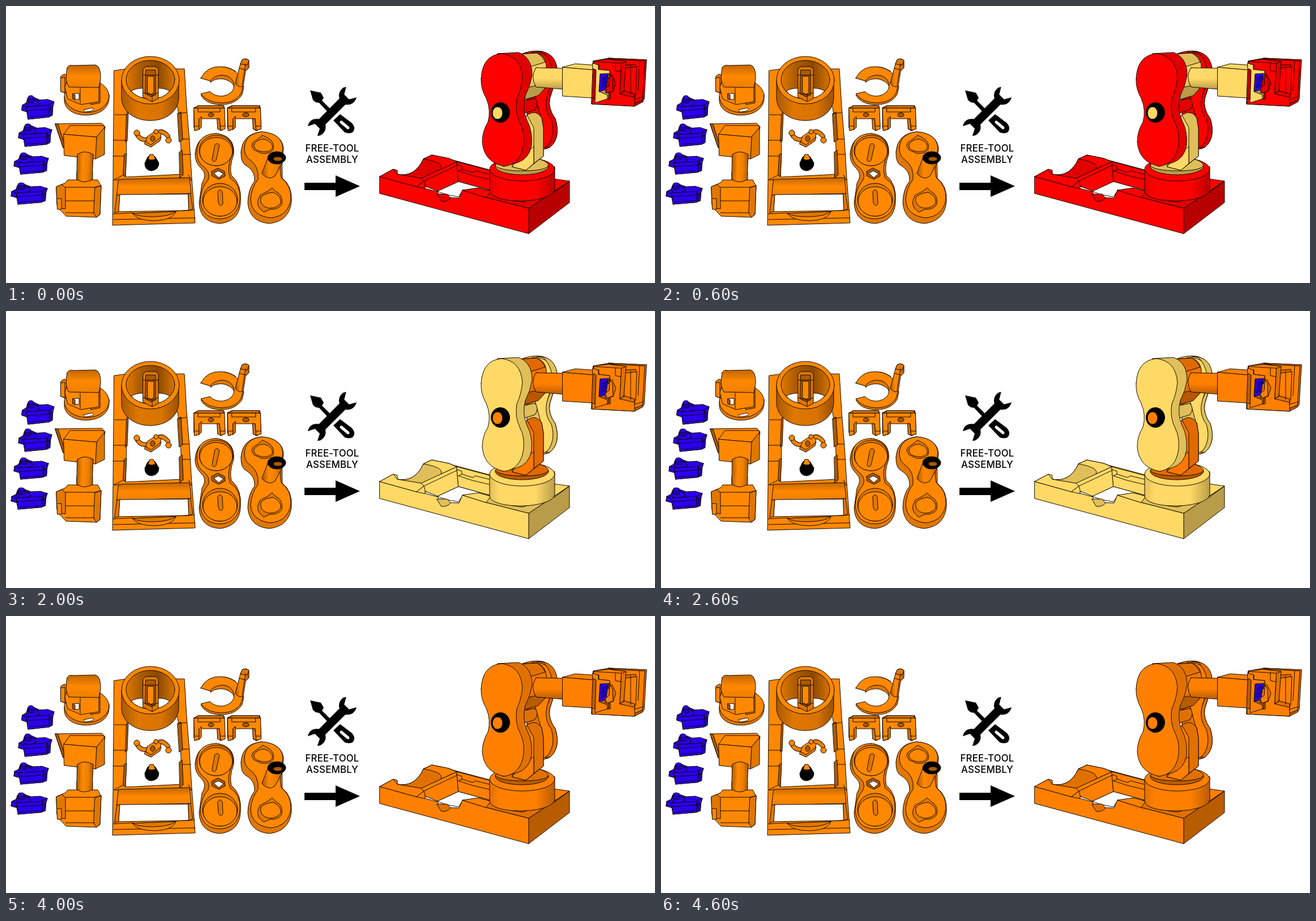
An HTML page that plays this animation: 1146x489 px, repeating every 5 s.

```html
<!DOCTYPE html>
<html lang="en">
<head>
<meta charset="utf-8">
<title>Free-tool assembly</title>
<style>
html, body { margin: 0; width: 100%; height: 100%; overflow: hidden; background: #fff; }
svg { display: block; width: 100%; height: 100%; }
g { stroke-linejoin: round; stroke-linecap: round; }
.edge { stroke: #160b00; stroke-width: 1; }
.o1 { fill: #ff8800; } .o2 { fill: #df7700; } .o3 { fill: #a95a00; }
.a1 { fill: var(--a1); } .a2 { fill: var(--a2); } .a3 { fill: var(--a3); }
.b1 { fill: var(--b1); } .b2 { fill: var(--b2); } .b3 { fill: var(--b3); }
.f1 { fill: var(--f1); } .f2 { fill: var(--f2); } .f3 { fill: var(--f3); }
.g1 { fill: var(--g1); } .g2 { fill: var(--g2); } .g3 { fill: var(--g3); }
.h1 { fill: var(--h1); } .h2 { fill: var(--h2); }
.k1 { fill: var(--k1); }
.blue { fill: #2a00ef; } .navy { fill: #1e00b4; }
.w { fill: #fff; } .n { fill: none; } .black { fill: #000; }
text { font: 500 16.8px Inter, "DejaVu Sans", sans-serif; text-anchor: middle; letter-spacing: .2px; }
</style>
</head>
<body>
<svg viewBox="0 0 1146 489" preserveAspectRatio="none">
<defs>
  <linearGradient id="tube"><stop stop-color="#a95a00"/><stop offset=".35" stop-color="#ff8800"/><stop offset=".7" stop-color="#ee7f00"/><stop offset="1" stop-color="#a95a00"/></linearGradient>
  <linearGradient id="collar"><stop stop-color="#a95a00"/><stop offset=".3" stop-color="#df7700"/><stop offset=".7" stop-color="#d97300"/><stop offset="1" stop-color="#9a5200"/></linearGradient>
  <linearGradient id="bore"><stop stop-color="#e07800"/><stop offset=".3" stop-color="#aa5b00"/><stop offset=".65" stop-color="#8a4900"/><stop offset="1" stop-color="#d87400"/></linearGradient>
  <linearGradient id="roll" x2="0" y2="1"><stop stop-color="#c06600"/><stop offset=".5" stop-color="#ff8800"/><stop offset="1" stop-color="#ee7f00"/></linearGradient>
  <linearGradient id="drum"><stop style="stop-color:var(--a2)"/><stop offset=".15" style="stop-color:var(--a1)"/><stop offset=".7" style="stop-color:var(--a1)"/><stop offset="1" style="stop-color:var(--a3)"/></linearGradient>
  <linearGradient id="wrist" x2="0" y2="1"><stop style="stop-color:var(--f1)"/><stop offset=".5" style="stop-color:var(--f1)"/><stop offset="1" style="stop-color:var(--f3)"/></linearGradient>
  <linearGradient id="hub" x2="0" y2="1"><stop style="stop-color:var(--b2)"/><stop offset=".5" style="stop-color:var(--b1)"/><stop offset="1" style="stop-color:var(--b3)"/></linearGradient>
  <g id="servo" class="edge">
    <path class="navy" d="M1 18L8 14L10 6Q16 0 23 5L32 9L46 8L49 11L57 12L55 19L54 36L48 39L11 43L9 30L0 27Z"/>
    <path class="blue" d="M8 20L48 18V39L11 43Z"/>
    <path class="blue" d="M1 18L8 14L32 9L46 8L57 12L48 18L8 21Z"/>
    <path class="blue" d="M1 18L8 21L9 30L0 27ZM49 17L57 12L55 20L50 24Z"/>
    <path class="blue" d="M8 13Q14 7 22 9Q31 11 30 17Q20 23 10 19Z"/>
    <path class="navy" d="M11 5V13Q16 16 21 13V5"/>
    <ellipse class="blue" cx="16" cy="4.500" rx="5" ry="3.500"/>
    <path class="n" d="M9 28L48 25M48 25L54 22M13 39L46 36"/>
  </g>
  <g id="bracket" class="edge">
    <path class="o3" d="M1 5L8 1H54L56 38L50 45L43 42V22H13V40L4 45L1 40Z"/>
    <path class="o1" d="M1 5H55L56 42L48 45L46 24H10V43L2 45Z"/>
    <path class="o2" d="M1 5L9 1H51L55 5ZM10 24L14 20V39L10 43ZM42 24H46L48 45L43 42Z"/>
    <path class="n" d="M8 5V12H47V5M3 37H9M48 37H55"/>
    <ellipse class="o3" cx="31" cy="17" rx="5" ry="3.500"/>
  </g>
</defs>

<g id="servos"></g>

<g class="edge">
  <!-- disc with motor housing -->
  <path class="o2" d="M103 160V167C105 202 181 202 182 163V156Z"/>
  <ellipse class="o1" cx="142.500" cy="159" rx="39.500" ry="29"/>
  <path class="o2" d="M150 174L166 171V133L162 128Z"/>
  <path class="o2" d="M97 124L103 120L109 124V155L97 151Z"/>
  <path class="o1" d="M97 127L104 126V153L97 151Z"/>
  <path class="o1" d="M104 143L109 128L164 131V169L132 174L109 164Z"/>
  <path fill="url(#roll)" d="M108 109Q111 103 119 105L158 104Q168 107 167 129L164 144L111 143Q103 131 108 109Z"/>
  <path class="n" d="M131 145V172"/>
  <path class="w" d="M118 155L129 154V165L121 165Z"/>
  <path class="o3" d="M118 155L122 157V165L118 164Z"/>
  <path class="w" d="M138 183L152 180Q157 181 152 185L141 187Q136 187 138 183Z"/>

  <!-- wrist piece -->
  <path class="o1" d="M87 208L169 207L175 213L172 229L110 253L101 250Z"/>
  <path class="o3" d="M87 208L92 209L106 252L101 250Z"/>
  <path class="o2" d="M160 231L174 213V262L158 270Z"/>
  <path class="o1" d="M102 226L160 231L158 270L103 264Z"/>
  <path class="o1" d="M102 226L113 211H171L174 214L160 231Z"/>
  <path fill="url(#tube)" d="M126 262Q138 253 154 262L152 306Q138 315 125 306Z"/>
  <path class="o1" d="M89 319L105 312L109 307H162L168 318L166 368L160 373L106 371L91 355Z"/>
  <path class="o2" d="M157 321L168 317L166 367L160 373L155 366Z"/>
  <path fill="url(#tube)" d="M125 294H153V306Q138 315 124 306Z" stroke="none"/>
  <path class="n" d="M105 320H157L168 317M105 344H156M105 365H156M125 293V306Q138 315 153 306V293"/>
  <path class="o2" d="M89 319L99 315L105 321V358L96 357L90 350Z"/>
  <path class="o1" d="M90 340H98V359H91Z"/>

  <!-- base frame -->
  <path class="o1" d="M191 114L213 111H315L319 178L324 239L328 304L334 383L188 387L189 307Z"/>
  <path class="w" d="M215 180L303 178L307 208L311 297L211 302L213 237Z"/>
  <path class="o3" d="M303 190L309 187L312 236L306 240ZM213 190L216 187L214 238L211 240ZM209 262L213 260L211 301L207 299ZM306 258L311 254L313 298L307 303Z"/>
  <path class="n" d="M190 237H213M324 235H311M192 192H212M304 190L319 188M189 265H209M311 262H326M206 299L190 307H328L322 298"/>
  <path fill="url(#roll)" d="M199 306L324 303L327 331L196 334Z"/>
  <path class="w" d="M201 333L322 332L323 361L199 363Z"/>
  <path class="o2" d="M196 334L201 333L199 363L192 365ZM322 332L326 331L330 358L323 361Z"/>
  <path class="n" d="M189 367L223 365M299 362L333 360M190 377L334 374"/>
  <path class="o1" d="M223 366L300 363Q294 378 262 379Q232 379 223 366Z"/>
  <path class="o2" d="M223 366Q235 373 263 372Q290 371 300 363Z"/>

  <!-- round socket -->
  <path fill="url(#collar)" d="M204 131V164C208 214 300 216 305 164V131Z"/>
  <ellipse class="o1" cx="255" cy="131" rx="51" ry="42"/>
  <ellipse fill="url(#bore)" cx="255" cy="130" rx="43" ry="34"/>
  <path class="w" d="M221 150Q230 145 242 145H269Q281 145 289 150Q278 164 255 164Q231 163 221 150Z"/>
  <path class="o2" d="M242 111L247 107H264L269 111V163L258 169L242 161Z"/>
  <path class="o3" d="M247 113H264V157L256 160L246 155Z"/>
  <path class="o1" d="M250 124H261V153L256 156L250 153Z"/>
  <path class="n" d="M242 122H269M242 153L258 157L269 153M258 157V168"/>

  <!-- linkage -->
  <path class="n" d="M231 226Q238 239 251 235M268 224Q276 218 286 230" stroke-width="8"/>
  <path class="n" d="M231 226Q238 239 251 235M268 224Q276 218 286 230" style="stroke:#f08000;stroke-width:6"/>
  <path class="o1" d="M250 230L265 220L274 226L272 236L256 249L246 243Z"/>
  <path class="o2" d="M246 239L256 245L274 231L272 238L256 249L245 244Z"/>
  <ellipse class="o3" cx="259" cy="234" rx="4" ry="5"/>
  <circle class="o1" cx="231" cy="224" r="5"/><circle class="o1" cx="287" cy="237" r="5"/><circle class="o1" cx="265" cy="222" r="4"/>

  <!-- threaded pin -->
  <path class="black" d="M250 267Q257 259 264 267L270 277Q270 289 257 291Q245 290 245 278Z"/>
  <path class="o1" d="M251 270L254 262H260L264 270Q257 274 251 270Z"/>

  <!-- open ring -->
  <path class="o2" d="M344 127L361 132V135Q369 127 385 129Q407 136 402 150Q395 164 378 161Q365 160 360 152L344 157Q352 172 374 174Q405 176 417 156L420 143L405 115Q374 95 344 127Z"/>
  <path class="o1" d="M344 127Q355 106 379 107Q411 109 418 138Q418 169 382 171Q356 171 344 155L360 151Q369 160 383 159Q403 155 403 139Q399 122 381 122Q367 123 361 132Z"/>
  <path fill="url(#tube)" d="M405 136L414 102L417 95Q423 91 429 96V109L423 115L419 141Q411 146 405 136Z"/>
  <path class="o2" d="M414 102L417 95Q423 91 429 96L426 104Z"/>
  <path class="n" d="M412 110L424 113M423 102L417 140"/>
  <use href="#bracket" x="331" y="175"/>
  <use href="#bracket" transform="translate(390 175) scale(1.080 1)"/>

  <!-- flat link -->
  <path class="o2" d="M334 261Q336 228 371 225Q405 229 402 262Q394 284 398 299Q417 315 414 347Q412 380 378 384Q343 382 341 348L346 313Q356 297 345 287Q333 276 334 261Z"/>
  <path class="o1" d="M337 258Q338 226 371 225Q401 229 401 258Q388 286 396 304Q415 315 413 342Q410 374 377 376Q344 374 343 341Q345 320 357 307Q362 294 349 284Q337 276 337 258Z"/>
  <ellipse class="o2" cx="371" cy="255" rx="30" ry="27"/><ellipse class="o1" cx="371" cy="257" rx="29" ry="25"/>
  <ellipse class="o2" cx="378" cy="342" rx="31" ry="29"/><ellipse class="o1" cx="378" cy="345" rx="30" ry="26"/>
  <path class="o2" d="M369 245Q373 240 377 246L371 272Q367 278 364 272ZM374 328Q378 321 382 328L383 349Q378 357 375 347Z"/>
  <path class="o3" d="M363 292L374 286L386 292L387 300L376 306L364 300Z"/>
  <path class="w" d="M367 295L375 291L384 296L376 303Z"/>

  <!-- link with axle -->
  <path class="o2" d="M415 258Q417 226 451 222Q488 225 490 252Q486 279 488 304Q506 318 504 346Q500 380 465 384Q430 381 427 348Q427 324 439 309Q440 292 426 283Q414 278 415 258Z"/>
  <path class="o1" d="M421 250Q423 225 452 222Q487 225 489 251Q481 282 486 303Q504 317 503 340Q499 371 467 374Q433 370 432 341Q434 320 445 306Q447 283 431 272Q420 264 421 250Z"/>
  <path class="o2" d="M436 241L447 233L453 228L461 232Q475 239 472 253Q466 262 451 260L438 254L434 247ZM449 334L462 327L470 321L476 327Q490 334 487 350Q481 360 466 359L455 364L447 356Q441 346 449 334Z"/>
  <path class="o1" d="M438 244Q444 235 456 235Q473 240 470 252Q463 260 447 256Q436 252 438 244ZM450 338Q457 330 472 329Q487 336 485 348Q479 357 464 357Q447 353 450 338Z"/>
  <path fill="url(#tube)" d="M463 268L488 276L475 300Q464 309 452 296Z"/>
  <ellipse class="black" cx="478" cy="268" rx="16" ry="11"/>
  <ellipse class="o3" cx="480" cy="270" rx="8" ry="4"/>
</g>

<!-- crossed tools and arrow -->
<g>
  <path class="black" d="M537 149L556 153L561 162L558 167L574 183L569 188L553 171L547 170L542 166Z"/>
  <path class="black" transform="translate(576 186) rotate(-45)" d="M-32 -7H25Q30 -17 43 -16L48 -13L36 -6V6L48 13Q34 20 25 8H-25Q-32 19 -45 15L-49 12L-37 6V-6L-49 -12Q-36 -20 -26 -7Z"/>
  <path class="black" d="M578 202L590 191L610 206Q619 215 612 223Q606 226 598 223Z"/>
  <path d="M592 205L604 215" stroke="#fff" stroke-width="5"/>
  <text x="576" y="257">FREE-TOOL</text>
  <text x="576" y="276.500">ASSEMBLY</text>
  <path class="black" d="M527 312H582V299L625 318L582 337V325H527Z"/>
</g>

<!-- assembled arm -->
<g class="edge">
  <path class="a1" d="M660 301L684 288L691 290V297Q722 303 737 270L752 263L797 274L857 290L995 309L923 358Z"/>
  <path class="a2" d="M691 297Q722 303 737 270L752 263L782 269L797 275L734 305L717 302Z"/>
  <path class="a1" d="M737 270L752 263L782 269L796 275L768 288Q774 276 737 270Z"/>
  <path class="a1" d="M733 304L796 275L799 310L762 327L740 318Z"/>
  <path class="a1" d="M796 275L857 291V326L799 310Z"/>
  <path class="n" d="M738 309L797 281M797 280L805 283V288L824 294L829 291L857 298M799 291L805 288M799 291L823 299L857 307"/>
  <path class="w" d="M762 327L799 310L857 326L806 326L799 337L778 333Z"/>
  <path class="a3" d="M923 357L995 309V347L923 402Z"/>
  <path class="a1" d="M660 301L725 319L733 318L740 322L762 328Q765 337 777 338L800 339L806 325L848 338L923 357V402L660 331Z"/>
  <path class="a1" d="M725 319L738 309L733 304L691 297L684 288L660 301Z"/>
  <path class="a2" d="M853 327Q873 343 912 346L968 329L995 309L923 357L848 338Z"/>
  <path class="a1" d="M806 325L834 321L856 327L848 338ZM725 319L738 309L740 317V322Z"/>
  <path class="a2" d="M761 332L779 332L785 339Q779 346 769 345Z"/>
  <path fill="url(#drum)" d="M854 291V328C861 351 965 349 969 324V284Z"/>
  <ellipse class="a1" cx="911.500" cy="288" rx="57.500" ry="21"/>
  <ellipse class="b3" cx="911" cy="283" rx="47" ry="15"/>
  <path class="b2" d="M864 282Q870 268 910 267Q955 268 958 282Q951 291 912 291Q873 291 864 282Z"/>

  <!-- rear link, axle and pedestal -->
  <path class="a2" d="M907 86Q927 77 946 80Q973 86 974 121L960 164Q957 182 970 199Q980 232 961 249Q940 261 921 236L918 114Z"/>
  <path class="a1" d="M929 82Q965 80 969 119L957 154Q951 178 963 197Q979 224 962 243L949 251L946 202L935 162Z"/>
  <path class="a2" d="M937 80Q973 79 974 119L960 164Q957 181 970 199Q980 232 961 249L953 251Q972 230 963 200Q946 177 960 147Q973 107 949 82Z"/>
  <path class="a2" d="M910 168L934 163Q942 172 934 183L909 191Z"/>
  <path class="b1" d="M905 204L924 191Q937 187 946 197L949 216V265L918 290L894 284Z"/>
  <path class="b2" d="M920 192L930 188Q941 188 946 198L949 216V265L932 278V215Z"/>
  <path class="b1" d="M905 270L932 248V278L918 290L894 284Z"/>
  <path fill="url(#hub)" d="M905 85L936 83Q952 87 954 104V143L938 158L919 165Z"/>
  <path class="b3" d="M917 145L951 137V146L940 158L917 165Z"/>
  <path class="b2" d="M906 85L937 83Q947 88 952 99L923 108Z"/>

  <!-- front link -->
  <path class="a2" d="M868 84L905 82Q929 91 929 122Q926 141 917 158Q911 181 920 202Q930 220 928 246Q924 270 902 277L878 283Z"/>
  <path class="a1" d="M839 128Q841 87 875 84Q909 88 912 126Q910 147 902 164Q898 187 908 207Q916 222 914 244Q909 279 880 283Q844 276 841 240Q841 221 851 205Q857 184 848 163Q838 146 839 128Z"/>
  <ellipse class="black" cx="873" cy="188" rx="16.500" ry="17.500"/>
  <ellipse class="k1" cx="868" cy="189" rx="9" ry="11"/>

  <!-- forearm -->
  <path fill="url(#wrist)" d="M936 109L986 110V147L936 143Q925 125 936 109Z"/>
  <path class="f1" d="M983 108L1042 113L1046 163L983 159Z"/>
  <path class="f1" d="M983 108L1005 102L1061 106L1042 113Z"/>

  <!-- gripper -->
  <path class="g3" d="M1037 97L1065 92L1131 95L1125 169L1110 177L1034 173Z"/>
  <path class="g2" d="M1064 92L1131 95L1127 165L1107 171L1111 102Z"/>
  <path class="g1" d="M1066 94L1128 97L1124 166L1109 172L1110 111L1088 109Z"/>
  <path class="g2" d="M1085 105L1112 103L1110 162L1089 166Z"/>
  <path class="g1" d="M1091 110L1114 107L1112 157L1092 164Z"/>
  <path class="g1" d="M1038 97L1064 94L1095 98L1087 104L1040 103Z"/>
  <path class="g1" d="M1038 98L1087 101L1084 154L1110 158V177L1035 173V163L1067 164V119L1047 113V104L1038 106Z"/>
  <path class="g2" d="M1087 101L1095 98L1091 150L1084 155ZM1084 155L1092 150L1110 155V161Z"/>
  <path class="n" d="M1076 101V114L1085 116M1103 106V156M1119 96L1116 149M1109 165L1126 160"/>

  <!-- servo flange and horn -->
  <path class="f3" d="M1046 112L1066 114L1064 164L1045 166Z"/>
  <path class="blue" d="M1049 120L1064 118L1062 147L1048 151Z"/>
  <path class="navy" d="M1052 128L1063 123V139L1051 144"/>
  <path class="f1" d="M1036 101L1046 104V112L1066 114V119L1049 120L1047 151L1062 157V164L1040 171L1042 113L1036 110Z"/>
  <path class="h2" d="M1062 130L1070 121L1077 136L1072 151L1059 153Z"/>
  <path class="h1" d="M1066 123L1071 128L1072 150L1061 154L1058 146L1065 140Z"/>
</g>
</svg>
<script>
const STEP = 1000;
// a: body, b: joints, f: forearm, g: gripper, h: horn, k: axle cap
const themes = [
  { a: "ff0000", b: "ffd966", f: "ffd966", g: "ff0000", h: "e40000", k: "ffd966" },
  { a: "008a48", b: "ffd98c", f: "ffd966", g: "008a48", h: "007a40", k: "ffd966" },
  { a: "ffd966", b: "ff7800", f: "ff8000", g: "ff8000", h: "ff8000", k: "ff8000" },
  { a: "ff8000", b: "008a12", f: "3f8c00", g: "3f8c00", h: "008a60", k: "3f8c00" },
  { a: "ff8000", b: "ff8000", f: "ff8000", g: "ff8000", h: "ff8000", k: "ff8000" }
];
const shades = [1, 0.88, 0.72];

const servoBoxes = [[28, 157, 57, 44], [22, 207, 59, 42], [14, 258, 61, 40], [9, 311, 64, 40]];
document.getElementById("servos").innerHTML = servoBoxes.map(([x, y, w, h]) =>
  `<use href="#servo" transform="translate(${x} ${y}) scale(${w / 57} ${h / 44})"/>`).join("");

const shade = (hex, k) =>
  `rgb(${[0, 2, 4].map(i => Math.round(parseInt(hex.slice(i, i + 2), 16) * k)).join()})`;

function paint(theme) {
  const style = document.documentElement.style;
  for (const [part, hex] of Object.entries(theme))
    shades.forEach((k, i) => style.setProperty(`--${part}${i + 1}`, shade(hex, k)));
}

let current = -1;
function tick() {
  const index = Math.floor(performance.now() / STEP) % themes.length;
  if (index !== current) paint(themes[current = index]);
  requestAnimationFrame(tick);
}
tick();
</script>
</body>
</html>
```
